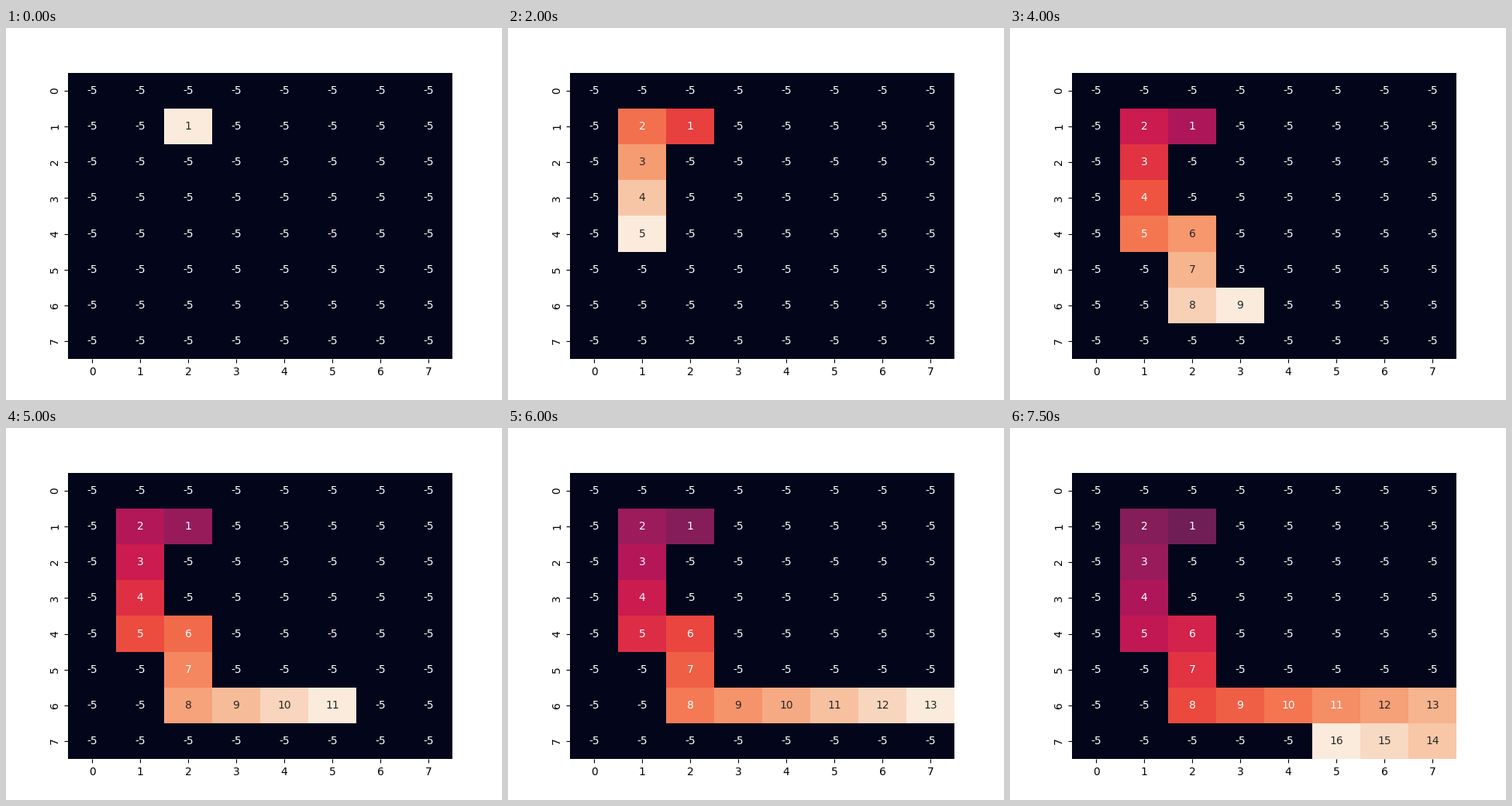
These frames come from a looping animation (640x480 px, 8000 ms). A matplotlib script:

```python
import numpy as np
import matplotlib.pyplot as plt
from matplotlib.animation import FuncAnimation
from matplotlib.colors import LinearSegmentedColormap

SIZE = 8
EMPTY = -5
STEP_MS = 500

START = (1, 2)
# Runs of the walk: (row step, column step, number of steps)
RUNS = [(0, -1, 1), (1, 0, 3), (0, 1, 1), (1, 0, 2),
        (0, 1, 5), (1, 0, 1), (0, -1, 2)]

# Dark blue through crimson and orange to cream, by position in 0..255
STOPS = {
    0: "#03051a", 23: "#221331", 46: "#451c47", 69: "#691f55",
    93: "#921c5b", 102: "#a11a5b", 109: "#ad1759", 116: "#b91657",
    128: "#cb1b4f", 139: "#d92847", 146: "#e13342", 153: "#e83f3f",
    162: "#ed503e", 182: "#f37651", 186: "#f47d57", 204: "#f69c73",
    209: "#f6a47c", 219: "#f6b48f", 232: "#f7c9aa", 255: "#faebdd",
}
CMAP = LinearSegmentedColormap.from_list(
    "heat", [(k / 255, c) for k, c in STOPS.items()], N=256)


def build_path():
    path = [START]
    for dr, dc, count in RUNS:
        for _ in range(count):
            r, c = path[-1]
            path.append((r + dr, c + dc))
    return path


def luminance(rgba):
    rgb = np.asarray(rgba[:3])
    linear = np.where(rgb <= 0.03928, rgb / 12.92,
                      ((rgb + 0.055) / 1.055) ** 2.4)
    return linear @ [0.2126, 0.7152, 0.0722]


def board(last):
    grid = np.full((SIZE, SIZE), EMPTY, dtype=float)
    for value, cell in enumerate(PATH[:last], start=1):
        grid[cell] = value
    return grid


PATH = build_path()

plt.rcParams["font.family"] = "DejaVu Sans"
fig = plt.figure(figsize=(6.4, 4.8), dpi=100, facecolor="white")
ax = fig.add_axes([0.125, 0.11, 0.775, 0.77])
mesh = ax.pcolormesh(board(1), cmap=CMAP, vmin=EMPTY, vmax=1)
ax.set(xlim=(0, SIZE), ylim=(SIZE, 0))
ax.spines[:].set_visible(False)

centers = np.arange(SIZE) + 0.5
ax.set_xticks(centers, range(SIZE))
ax.set_yticks(centers, range(SIZE), rotation="vertical", va="center")

labels = {(r, c): ax.text(c + 0.5, r + 0.5, "", ha="center", va="center")
          for r in range(SIZE) for c in range(SIZE)}


def update(step):
    last = step + 1
    grid = board(last)
    mesh.set_array(grid)
    mesh.set_clim(EMPTY, last)
    for cell, label in labels.items():
        shade = mesh.cmap(mesh.norm(grid[cell]))
        label.set_text(f"{grid[cell]:.0f}")
        label.set_color("0.15" if luminance(shade) > 0.408 else "white")
    return [mesh, *labels.values()]


anim = FuncAnimation(fig, update, frames=len(PATH), interval=STEP_MS,
                     repeat=True)
plt.show()
```
